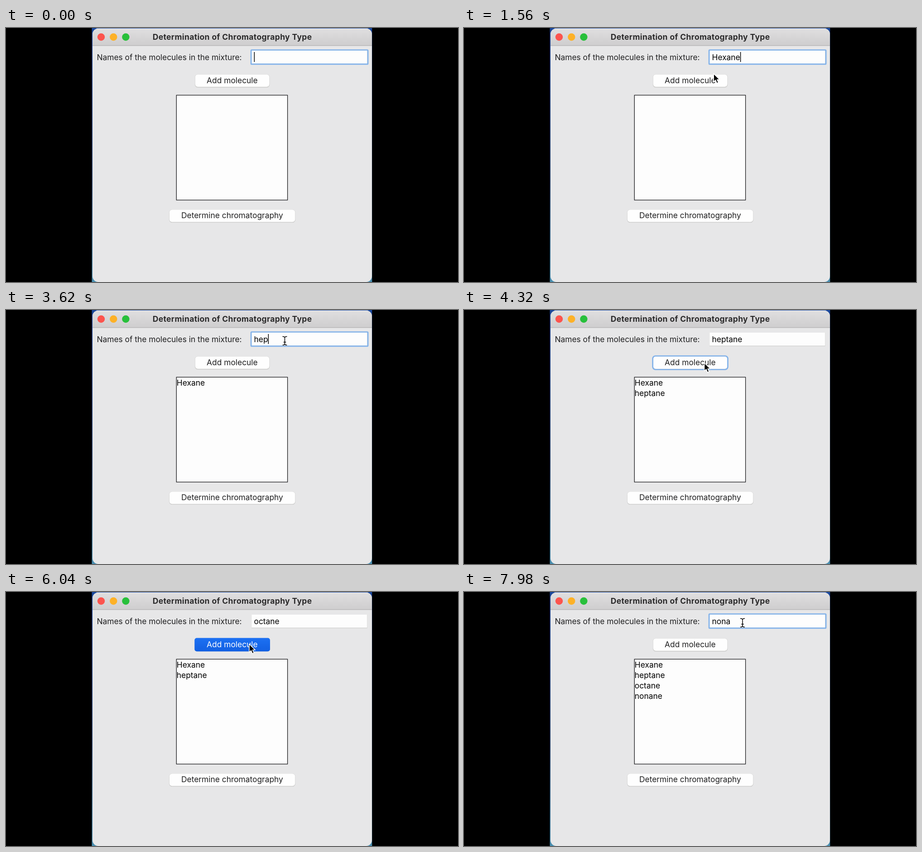
Animation, 998 px wide and 561 px high, one loop 8 s. Source, as an HTML page:

```html
<!DOCTYPE html>
<html lang="en">
<head>
<meta charset="utf-8">
<title>Determination of Chromatography Type</title>
<style>
  html, body { margin: 0; width: 100%; height: 100%; overflow: hidden; background: #000; }
  svg { display: block; width: 100%; height: 100%; }
  text { font: 17.36px Inter, Roboto, sans-serif; fill: #1f1f20; white-space: pre; }
  .title { font-weight: 700; font-size: 17.5px; letter-spacing: .36px; fill: #2b2a2b; }
  .mid { text-anchor: middle; }
  .value { fill: #000; }
  .ring { fill: none; stroke: #82b2ea; stroke-width: 2.7; }
</style>
</head>
<body>
<svg viewBox="0 0 998 561">
  <defs>
    <linearGradient id="desk" x2="0" y2="1">
      <stop offset="0" stop-color="#1b489c"/>
      <stop offset=".6" stop-color="#28456f"/>
      <stop offset="1" stop-color="#4a8fb0"/>
    </linearGradient>
    <linearGradient id="bar" x2="0" y2="1">
      <stop offset="0" stop-color="#e0dfe0"/>
      <stop offset="1" stop-color="#cecdce"/>
    </linearGradient>
    <linearGradient id="blue" x2="0" y2="1">
      <stop offset="0" stop-color="#1c70f2"/>
      <stop offset="1" stop-color="#1260e2"/>
    </linearGradient>
    <clipPath id="win"><rect x="191" y="1" width="617" height="560" rx="13"/></clipPath>
    <path id="beamShape" d="M-4.5-9.5Q-.6-9.5 0-7Q.6-9.5 4.5-9.5M0-7V7M-4.5 9.5Q-.6 9.5 0 7Q.6 9.5 4.5 9.5M-2.2 3H2.2"/>
  </defs>

  <rect width="998" height="561"/>
  <rect x="189.5" width="618.8" height="561" fill="url(#desk)"/>
  <g clip-path="url(#win)">
    <rect x="191" y="1" width="618" height="560" fill="#e7e7e8"/>
    <rect x="191" y="1" width="618" height="38" fill="url(#bar)"/>
    <rect x="191" y="1" width="618" height="1" fill="#f0f0f0"/>
    <rect x="191" y="38.3" width="618" height="1.2" fill="#b1b0b1"/>
  </g>
  <circle cx="210" cy="20" r="8.2" fill="#fc544e"/>
  <circle cx="237.3" cy="20" r="8.2" fill="#fdb127"/>
  <circle cx="264.4" cy="20" r="8.2" fill="#28c03b"/>
  <text class="title mid" x="499.6" y="26">Determination of Chromatography Type</text>

  <text x="200.4" y="70.5">Names of the molecules in the mixture:</text>
  <rect x="542" y="50" width="255.8" height="29.8" fill="#c9c9c8"/>
  <rect x="542.2" y="50" width="255.2" height="28.8" fill="#fdfdfd"/>
  <rect id="fieldRing" class="ring" x="541.1" y="48.5" width="258" height="31.4" rx="1.5"/>
  <text id="field" class="value" x="547.5" y="70.5"></text>
  <rect id="caret" y="53" width="1.5" height="22"/>

  <rect x="417" y="102.3" width="165.2" height="29" rx="6.5" fill="#c5c5c3"/>
  <rect x="417.6" y="102.5" width="164" height="27.6" rx="6" fill="#fefefe"/>
  <rect id="addRing" class="ring" x="416.7" y="101.5" width="165.8" height="30" rx="6"/>
  <rect id="pressed" x="416.3" y="101.5" width="166.7" height="29.8" rx="5" fill="url(#blue)"/>
  <text id="addLabel" class="mid" x="499.4" y="122">Add molecule</text>

  <rect x="376.3" y="148.4" width="245.3" height="231.6" fill="#fdfdfd" stroke="#19191c" stroke-width="1.3"/>
  <g id="list"></g>

  <rect x="360.2" y="401" width="278.8" height="28.8" rx="6.5" fill="#c9c9c8"/>
  <rect x="360.8" y="401.2" width="277.6" height="27.4" rx="6" fill="#fefefe"/>
  <text class="mid" x="499.4" y="420">Determine chromatography</text>

  <path id="arrow" d="M0 0V18L4.2 14.2 7 21 10.4 19.6 7.6 13H13.2Z" stroke="#fff" stroke-width="1.5" stroke-linejoin="round"/>
  <g id="beam" fill="none" stroke-linecap="round">
    <use href="#beamShape" stroke="#fff" stroke-width="3.2"/>
    <use href="#beamShape" stroke="#000" stroke-width="1.5"/>
  </g>
</svg>

<script>
const LOOP = 8000;
const $ = id => document.getElementById(id);
const show = (id, on) => $(id).setAttribute('visibility', on ? 'visible' : 'hidden');

// Field contents over time
const edits = [{ t: 0, text: '' }];
function type(word, start, step, from = 0) {
  for (let i = from; i < word.length; i++)
    edits.push({ t: start + (i - from) * step, text: word.slice(0, i + 1) });
}
function erase(word, start, step) {
  for (let i = 1; i <= word.length; i++)
    edits.push({ t: start + (i - 1) * step, text: word.slice(0, -i), erased: true });
}
type('H', 200, 0);
type('Hexane', 860, 110, 1);
erase('Hexane', 2480, 90);
type('heptane', 3400, 90);
erase('heptane', 4600, 55);
type('octane', 5050, 95);
erase('octane', 6450, 50);
type('nonane', 6760, 70);
erase('nonane', 7840, 80);

// Button down, button up, field focused again
const adds = [
  { word: 'Hexane', down: 1720, up: 1900, focus: 2420 },
  { word: 'heptane', down: 4130, up: 4270, focus: 4580 },
  { word: 'octane', down: 5960, up: 6120, focus: 6430 },
  { word: 'nonane', down: 7380, up: 7500, focus: 7740 }
];

// Pointer stops: time, x, y
const path = [
  [520, 640, 88], [700, 595, 60], [1370, 595, 60], [1660, 535, 116], [1960, 535, 116],
  [2240, 615.5, 72], [2300, 615.5, 72], [2400, 615.5, 68], [3900, 615.5, 68], [4080, 530, 117],
  [4310, 530, 117], [4550, 625, 66], [5560, 625, 66], [5880, 537, 115], [6160, 537, 115],
  [6400, 618, 68], [7110, 618, 68], [7320, 534, 116], [7530, 534, 116], [7700, 615, 68]
];

const rows = adds.map((a, i) => {
  const row = document.createElementNS('http://www.w3.org/2000/svg', 'text');
  row.setAttribute('class', 'value');
  row.setAttribute('x', 376.8);
  row.setAttribute('y', 167 + i * 23.1);
  row.textContent = a.word;
  $('list').append(row);
  return row;
});

function pointerAt(t) {
  if (t < path[0][0]) return null;
  const i = path.findIndex(p => p[0] > t);
  if (i < 0) return path[path.length - 1].slice(1);
  const [t0, x0, y0] = path[i - 1], [t1, x1, y1] = path[i];
  const k = (t - t0) / (t1 - t0), e = k * k * (3 - 2 * k);
  return [x0 + (x1 - x0) * e, y0 + (y1 - y0) * e];
}

function draw(t) {
  const edit = edits.filter(e => e.t <= t).pop();
  const down = adds.some(a => t >= a.down && t < a.up);
  const onButton = adds.some(a => t >= a.down && t < a.focus);

  $('field').textContent = edit.text;
  const width = edit.text ? $('field').getComputedTextLength() : 0;
  const erasing = edit.erased && edit.text;
  $('caret').setAttribute('x', 547.6 + width);
  show('caret', !onButton && !erasing && (t - edit.t) % 900 < 600);

  show('fieldRing', !onButton);
  show('addRing', onButton && !down);
  show('pressed', down);
  $('addLabel').style.fill = down ? '#fff' : '';
  rows.forEach((row, i) => row.setAttribute('visibility', t >= adds[i].up ? 'visible' : 'hidden'));

  const p = pointerAt(t);
  const inField = p && p[0] > 541 && p[0] < 798 && p[1] > 49 && p[1] < 80;
  show('beam', inField);
  show('arrow', p && !inField);
  if (p) for (const id of ['beam', 'arrow']) $(id).setAttribute('transform', `translate(${p})`);
}

const start = performance.now();
function tick() {
  draw((performance.now() - start) % LOOP);
  requestAnimationFrame(tick);
}
tick();
</script>
</body>
</html>
```
